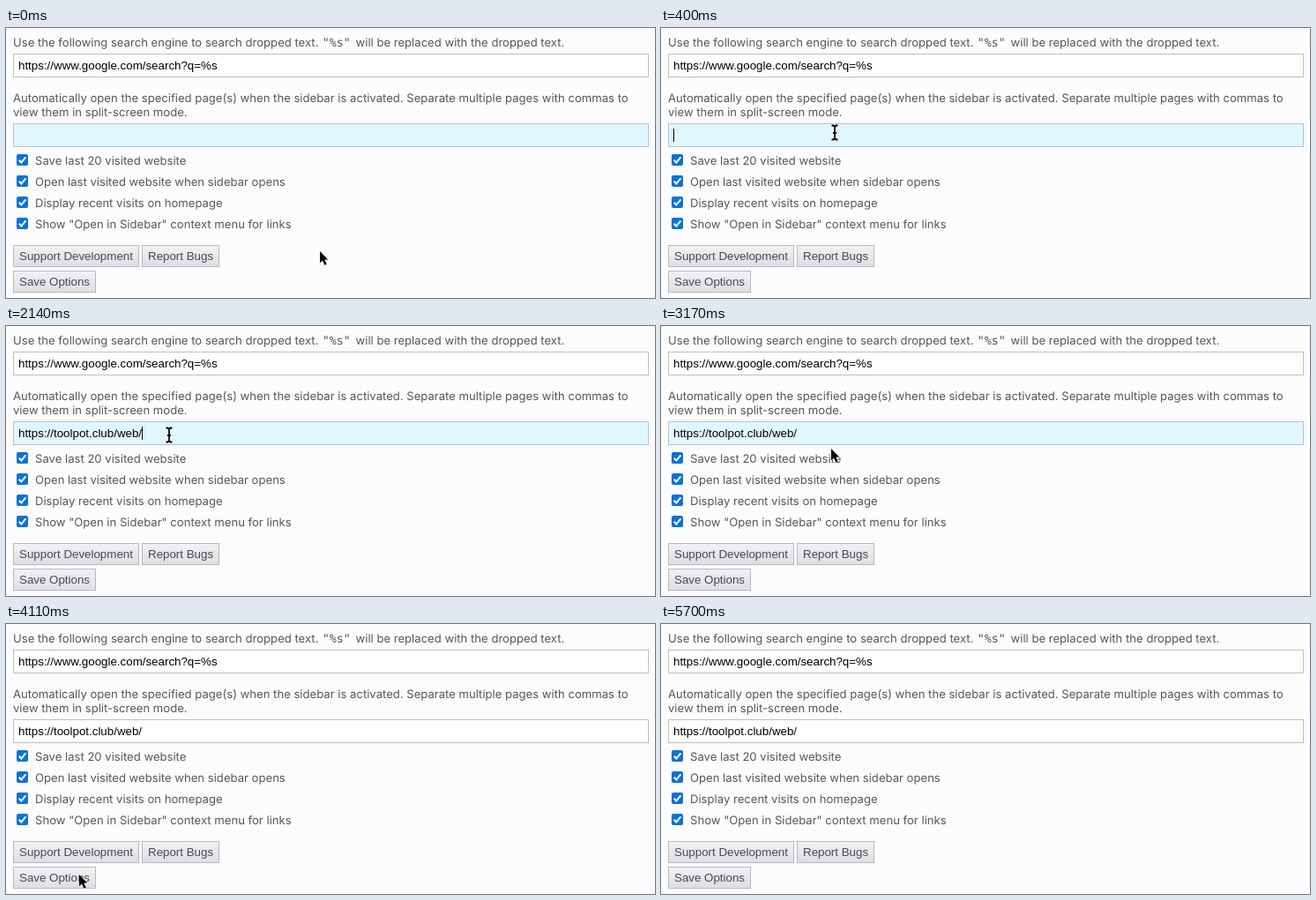
Write an HTML page that moves like this. It is 736x306 px and loops after 7030 ms.

```html
<!DOCTYPE html>
<html lang="en">
<head>
<meta charset="utf-8">
<title>Sidebar options</title>
<style>
  html, body { margin: 0; width: 100%; height: 100%; overflow: hidden; background: #fcfcfd; }
  svg { display: block; width: 736px; height: 306px; }
  text { font: 13.1px Inter, sans-serif; fill: #55555f; white-space: pre; text-rendering: geometricPrecision; }
  .mono { font: 13.333px "DejaVu Sans Mono", monospace; }
  .value, .button text { font: 13.333px "Liberation Sans", Arial, sans-serif; text-rendering: auto; }
  .value { fill: #000; }
  .button text { fill: #48484e; }
  .field { fill: #fefefc; stroke: #c0c0b4; }
  .focus { fill: #e0f7fd; stroke: #b0c2de; }
  .button rect { fill: url(#grey); stroke: #b8b8c0; }
</style>
</head>
<body>
<svg viewBox="0 0 736 306">
  <defs>
    <linearGradient id="grey" x2="0" y2="1">
      <stop offset="0" stop-color="#f2f2f5"/>
      <stop offset="1" stop-color="#dedee2"/>
    </linearGradient>
  </defs>

  <text x="8" y="21">Use the following search engine to search dropped text.<tspan class="mono" x="358.7">"%s"</tspan><tspan x="396.5">will be replaced with the dropped text.</tspan></text>
  <rect class="field" x="8.5" y="29.5" width="720" height="26"/>
  <text class="value" x="14" y="47">https://www.google.com/search?q=%s</text>

  <text x="8" y="84">Automatically open the specified page(s) when the sidebar is activated. Separate multiple pages with commas to</text>
  <text x="8" y="100">view them in split-screen mode.</text>
  <rect id="pages" class="field" x="8.5" y="108.5" width="720" height="26"/>
  <text id="address" class="value" x="14" y="126">https://toolpot.club/web/</text>
  <rect id="caret" y="114" width="1" height="15"/>

  <g id="controls"></g>
  <text id="status" x="106" y="292">Options saved.</text>

  <g id="pointer">
    <path id="arrow" d="M0 0V13.2L3 10.4L5.3 15.7L7.7 14.7L5.4 9.5H9.2Z" stroke="#fff" paint-order="stroke"/>
    <g id="beam" fill="none">
      <path id="beamShape" d="M-3.5 -7.5H-1.5L0 -6L1.5 -7.5H3.5M0 -6V7M-3.5 8.5H-1.5L0 7L1.5 8.5H3.5M-2 1H2" stroke="#fff" stroke-width="3"/>
      <use href="#beamShape"/>
      <path d="M-3.5 -7.5H-1.5L0 -6L1.5 -7.5H3.5M0 -6V7M-3.5 8.5H-1.5L0 7L1.5 8.5H3.5M-2 1H2" stroke="#000" stroke-width="1.8"/>
    </g>
  </g>
</svg>
<script>
const LOOP = 7030;
const $ = id => document.getElementById(id);

const checkbox = (label, i) => {
  const y = 143 + 24 * i;
  return `<rect x="12" y="${y}" width="13" height="13" rx="2" fill="#0b72d8"/>
    <path d="M14.8 ${y + 6.8}l2.6 2.6l5 -6" fill="none" stroke="#fff" stroke-width="2"/>
    <text x="33" y="${y + 12}">${label}</text>`;
};

const button = (label, x, y, width, height) =>
  `<g class="button">
    <rect x="${x + .5}" y="${y + .5}" width="${width - 1}" height="${height - 1}"/>
    <text x="${x + 7}" y="${y + 17}">${label}</text>
  </g>`;

$('controls').innerHTML = [
  'Save last 20 visited website',
  'Open last visited website when sidebar opens',
  'Display recent visits on homepage',
  'Show "Open in Sidebar" context menu for links'
].map(checkbox).join('') +
  button('Support Development', 8, 246, 143, 25) +
  button('Report Bugs', 154, 246, 88, 25) +
  button('Save Options', 8, 275, 94, 25);

// Pointer stops: time, x, y
const path = [
  [0, 356, 253], [30, 356, 253], [210, 262, 162], [370, 197, 118],
  [910, 197, 118], [1070, 170, 121], [1150, 167, 122], [1370, 185, 123],
  [3100, 185, 123], [3300, 208, 168], [3540, 195, 240], [3740, 108, 281],
  [3970, 83, 284], [4670, 83, 284], [4790, 67, 284], [5260, 67, 284],
  [5700, 222, 310], [LOOP, 222, 310]
];
const caretOn = [[310, 910], [1510, 2750], [3350, 3950]];
const PASTE = 2110, PRESS = 4110, RELEASE = 4230, CLEAR = 4980;

function pointerAt(t) {
  const i = path.findIndex(stop => stop[0] > t);
  const [t0, x0, y0] = path[i - 1], [t1, x1, y1] = path[i];
  const k = (t - t0) / (t1 - t0);
  return [x0 + (x1 - x0) * k, y0 + (y1 - y0) * k];
}

const show = (id, on) => $(id).setAttribute('visibility', on ? 'visible' : 'hidden');

function draw(t) {
  const [x, y] = pointerAt(t).map(Math.round);
  const overField = y > 108 && y < 135;
  $('pointer').setAttribute('transform', `translate(${x} ${y})`);
  show('arrow', !overField);
  show('beam', overField);

  $('pages').classList.toggle('focus', t < PRESS);
  show('address', t >= PASTE);
  $('caret').setAttribute('x', t < PASTE ? 14 : 154);
  show('caret', caretOn.some(([from, to]) => t >= from && t < to));
  show('status', t >= RELEASE && t < CLEAR);
}

const start = performance.now();
function tick() {
  draw((performance.now() - start) % LOOP);
  requestAnimationFrame(tick);
}
tick();
</script>
</body>
</html>
```
